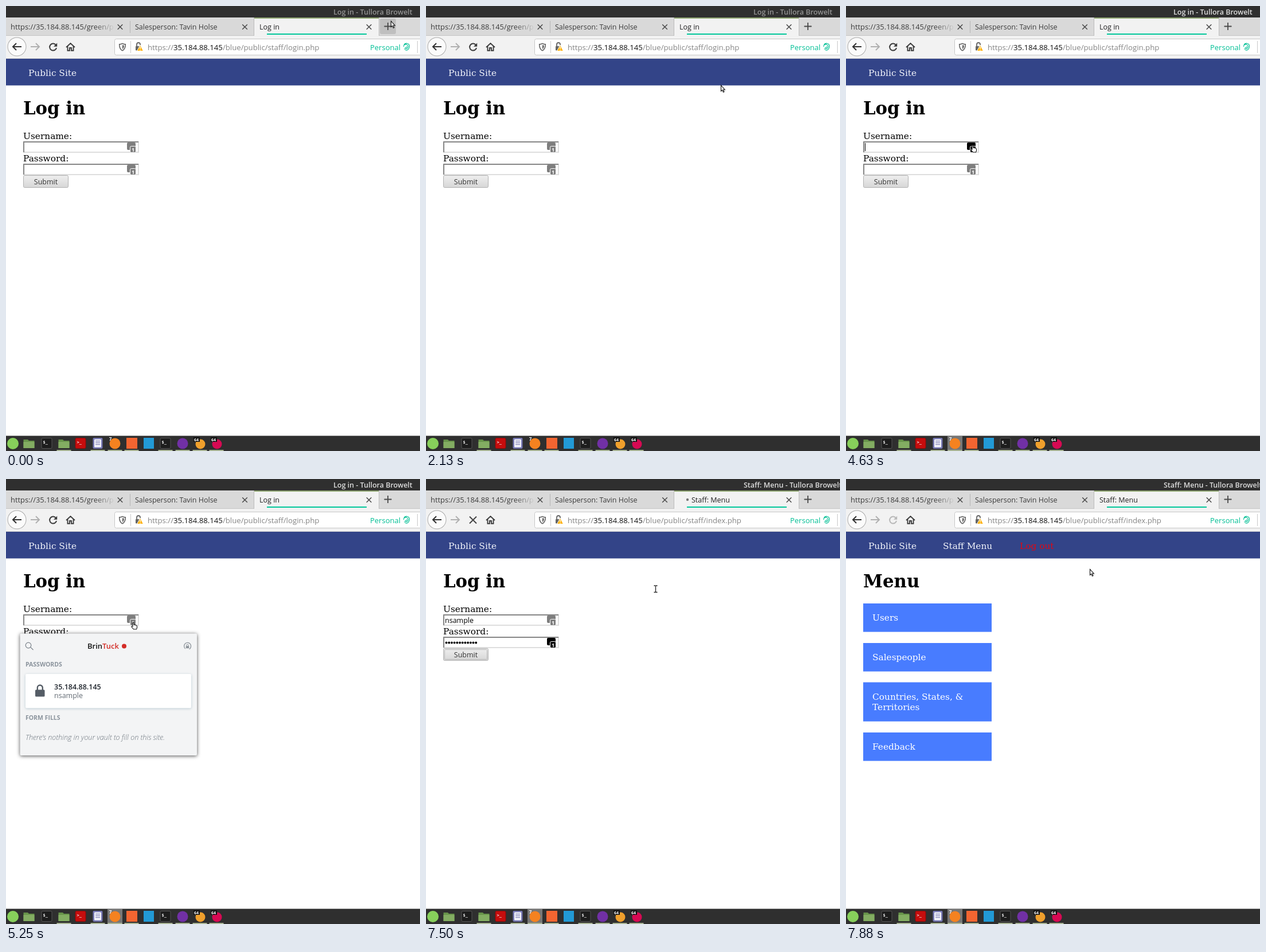
An HTML page with a canvas that plays this animation: 722x776 px, repeating every 8 s.

```html
<!DOCTYPE html>
<html lang="en">
<head>
<meta charset="utf-8">
<title>Log in</title>
<style>
html, body { margin: 0; width: 100%; height: 100%; overflow: hidden; background: #fff; }
canvas { display: block; }
</style>
</head>
<body>
<canvas id="stage" width="722" height="776"></canvas>
<script>
const ctx = document.getElementById('stage').getContext('2d');
const LOOP = 8000;
const UI = '"Open Sans", "Noto Sans", sans-serif';
const SERIF = '"DejaVu Serif", "Noto Serif", serif';
const MONO = '"DejaVu Sans Mono", monospace';
const BODY = `15.36px ${SERIF}`;
const HEADING = `bold 30.72px ${SERIF}`;
const HOST = '35.184.88.145';
const APP = 'Tullora Browelt';
const USER = 'nsample';

// Pointer positions: time, x, y, shape (arrow unless given)
const POINTER = [
  [0, 671, 26], [250, 648, 22], [380, 634, 19], [500, 625, 18],
  [880, 650, 17], [1000, 685, 12], [1130, 712, 10],
  [1630, 700, 18], [1750, 660, 46], [1880, 606, 84], [2000, 553, 119],
  [2130, 514, 138], [2250, 488, 142], [2380, 474, 137],
  [2500, 480, 134], [2630, 505, 118], [2750, 537, 95], [2880, 561, 80, 'beam'],
  [3500, 233, 204], [3750, 226, 223], [3880, 215, 240, 'hand'],
  [4500, 216, 241, 'hand'], [4630, 217, 242, 'hand'], [5000, 218, 249, 'hand'],
  [5500, 208, 317], [5750, 209, 341, 'hand'], [6000, 210, 346, 'hand'],
  [6250, 208, 346], [6380, 200, 346], [6630, 114, 316], [6880, 96, 312],
  [7000, 82, 309], [7250, 222, 281, 'hand'], [7500, 400, 191, 'beam'], [7630, 425, 157]
];

function rect(x, y, w, h, fill) {
  ctx.fillStyle = fill;
  ctx.fillRect(x, y, w, h);
}

function round(x, y, w, h, r, fill, stroke) {
  ctx.beginPath();
  ctx.roundRect(x, y, w, h, r);
  if (fill) { ctx.fillStyle = fill; ctx.fill(); }
  if (stroke) { ctx.strokeStyle = stroke; ctx.lineWidth = 1; ctx.stroke(); }
}

function disc(x, y, r, fill) {
  ctx.beginPath();
  ctx.arc(x, y, r, 0, Math.PI * 2);
  ctx.fillStyle = fill;
  ctx.fill();
}

function text(str, x, y, font, fill, align = 'left') {
  ctx.font = font;
  ctx.fillStyle = fill;
  ctx.textAlign = align;
  ctx.fillText(str, x, y);
  return x + ctx.measureText(str).width;
}

function path(d, x, y, { fill, stroke, width = 1 }) {
  ctx.save();
  ctx.translate(x, y);
  const p = new Path2D(d);
  if (fill) { ctx.fillStyle = fill; ctx.fill(p); }
  if (stroke) { ctx.strokeStyle = stroke; ctx.lineWidth = width; ctx.stroke(p); }
  ctx.restore();
}

const cross = (x, y, r, stroke, width) =>
  path(`M${-r} ${-r}L${r} ${r}M${r} ${-r}L${-r} ${r}`, x, y, { stroke, width });

function titleBar(s) {
  rect(0, 0, 722, 20, '#2f2f2f');
  const font = `600 12.5px ${UI}`;
  text(`${s.title} - ${APP}`, s.staff ? 554 : 571, 15, font, s.focused ? '#dedede' : '#929292');
}

function tabs(s, t) {
  const font = `12.5px ${UI}`;
  rect(0, 20, 722, 32, '#d9d9d9');
  rect(0, 51, 722, 1, '#c4c4c4');
  rect(216, 26, 1, 21, '#b5b5b5');

  const fade = ctx.createLinearGradient(155, 0, 190, 0);
  fade.addColorStop(0, '#3c3c3c');
  fade.addColorStop(1, '#3c3c3c00');
  ctx.save();
  ctx.beginPath();
  ctx.rect(0, 20, 189, 30);
  ctx.clip();
  text(`https://${HOST}/green/public`, 8, 40.5, `12.9px ${UI}`, fade);
  ctx.restore();
  text('Salesperson: Tavin Holse', 225, 40.5, font, '#3c3c3c');

  rect(432, 20, 219, 32, '#bdbdbd');
  rect(433, 20, 217, 32, '#f2f2f2');
  rect(433, 20, 217, 2, '#8fa571');
  rect(455, 48, 174, 2, '#00c79a');
  if (s.loading) disc(450 + 6 * Math.cos((t - 7500) / 250 * Math.PI), 36, 2.2, '#777');
  text(s.title, s.loading ? 463 : 442, 40.5, font, '#222');

  for (const x of [199, 416.5, 633]) cross(x, 36.5, 4.3, '#444', 1.4);
  if (t < 250) round(652, 22, 28, 27, 3, '#bfbfbf');
  path('M-6.5 0H6.5M0 -6.5V6.5', 666, 35.5, { stroke: '#4a4a4a', width: 1.8 });
}

function reload(color) {
  path('M5.2 -3.2A6 6 0 1 0 6 1.4', 82, 71.5, { stroke: color, width: 2 });
  path('M7.2 -7V-.8H1Z', 82, 71.5, { fill: color });
}

function toolbar(s) {
  rect(0, 52, 722, 40, '#f2f2f2');
  rect(0, 91, 722, 1, '#cfcfcf');

  disc(19, 71, 16.5, '#a9a9a9');
  disc(19, 71, 15.5, '#fbfbfb');
  path('M8 0H-6.5M-1 -6L-7 0L-1 6', 19, 71, { stroke: '#333', width: 2 });
  path('M-8 0H6.5M1 -6L7 0L1 6', 51, 71, { stroke: '#b0b0b0', width: 2 });
  if (s.stop) cross(82, 71.5, 6, '#444', 2);
  else reload(s.idle ? '#b8b8b8' : '#3c3c3c');
  path('M-7.5 .5L0 -6.5L7.5 .5M-5 -1V6.2H-1.5V1.5H1.5V6.2H5V-1', 112.5, 71.5,
    { stroke: '#3c3c3c', width: 1.9 });

  round(189.5, 57.5, 545, 28, 3, '#fff', '#c6c6c6');
  path('M0 -6.2C2 -5 4 -4.7 5.3 -4.7C5.3 1 4 4.5 0 6.3C-4 4.5 -5.3 1 -5.3 -4.7C-4 -4.7 -2 -5 0 -6.2Z',
    203, 71.5, { stroke: '#5c5c5c', width: 1.5 });
  path('M0 -3.6C1.2 -3.2 2 -3 2.8 -2.8C2.6 1 1.8 2.6 0 3.6Z', 203, 71.5, { fill: '#5c5c5c' });
  rect(217, 61, 1, 21, '#c9c9c9');
  rect(717, 61, 1, 21, '#c9c9c9');

  path('M-3 0V-3A3 3 0 0 1 3 -3V0', 231, 70, { stroke: '#666', width: 1.8 });
  round(226, 70, 10, 7.5, 1, '#666');
  path('M0 -5.5L5.5 5H-5.5Z', 234, 73.5, { fill: '#ffb000', stroke: '#fff' });
  rect(233.4, 71, 1.3, 4, '#fff');
  rect(233.4, 76, 1.3, 1.3, '#fff');

  const font = `13.2px ${UI}`;
  let x = text('https://', 247, 76.5, font, '#858585');
  x = text(HOST, x, 76.5, font, '#111');
  text(`/blue/public/staff/${s.staff ? 'index' : 'login'}.php`, x, 76.5, font, '#858585');
  text('Personal', 635, 76.5, `13px ${UI}`, '#00bf95');
  path('M-4.5 -3.5A5 5 0 0 1 5 -1.5C5 3 2.5 6 -2 6M-5 -.5A3.8 3.8 0 0 1 2.6 -1C2.6 2 .5 3.7 -4 3.7M-3 1.4C-.5 1.4 .3 .5 .2 -1',
    698.5, 71.5, { stroke: '#00bf95', width: 1.2 });
}

function fillIcon(y, color) {
  round(211, y, 15, 13, 2, color);
  round(216.5, y + 6.5, 10, 11, 2, color, '#fff');
  text('1', 221.6, y + 15.5, `bold 9px ${UI}`, '#fff', 'center');
}

function field(label, y, value, iconColor) {
  text(label, 30, y - 4, BODY, '#000');
  rect(30, y, 202, 20, '#dedede');
  rect(30, y, 201, 2, '#868686');
  rect(30, y, 2, 19, '#868686');
  rect(32, y + 2, 198, 16, '#fff');
  if (value) text(value, 33, y + 15, `12.5px ${UI}`, '#000');
  fillIcon(y + 2, iconColor);
}

function loginPage(s, t) {
  text('Log in', 30, 188.5, HEADING, '#000');
  const hot = t >= 3880 && t < 5000;
  field('Username:', 236, s.filled && USER, hot ? '#000' : '#7e7e7e');
  field('Password:', 275, '', t >= 7250 ? '#000' : '#7e7e7e');
  if (s.filled) for (let i = 0; i < 12; i++) disc(35.5 + i * 4.7, 285.5, 1.9, '#000');
  if (t >= 4130 && t < 5250) rect(33, 239, 1, 14, '#000');

  const g = ctx.createLinearGradient(0, 295, 0, 317);
  g.addColorStop(0, '#efefef');
  g.addColorStop(1, '#d6d6d6');
  round(30.5, 295.5, 78, 21, 2, g, '#b1b1b1');
  if (t >= 6880) round(32.5, 297.5, 74, 17, 1, null, '#b8b8b8');
  text('Submit', 69.5, 311, `12.5px ${UI}`, '#333', 'center');
}

function menuPage() {
  text('Staff Menu', 169, 122, BODY, '#f2f4fb');
  text('Log out', 303, 122, BODY, '#e00814');
  text('Menu', 30, 188.5, HEADING, '#000');
  const items = [[217, 'Users'], [286, 'Salespeople'],
    [354.5, 'Countries, States, &', 'Territories'], [442, 'Feedback']];
  for (const [y, ...lines] of items) {
    rect(30, y, 224, 31 + 18.6 * lines.length, '#487cff');
    lines.forEach((line, i) => text(line, 46, y + 30.3 + i * 18.6, BODY, '#fff'));
  }
}

function shadowBox(x, y, w, h, fill, color, blur, dy) {
  ctx.save();
  ctx.shadowColor = color;
  ctx.shadowBlur = blur;
  ctx.shadowOffsetY = dy;
  round(x, y, w, h, 2, fill);
  ctx.restore();
}

function popup() {
  shadowBox(24.5, 269.5, 308.5, 212.5, '#f3f4f5', '#000000b0', 6, 1);
  path('M3.3 3.3L8 8M4.3 0A4.8 4.8 0 1 1 -5.3 0A4.8 4.8 0 1 1 4.3 0', 39.5, 290,
    { stroke: '#7a828a', width: 1.2 });
  path('M-3.8 4.5A6 6 0 1 1 3 5.2', 316.5, 291.5, { stroke: '#8d949b', width: 1.3 });
  path('M-1.7 0V-1.5A1.7 1.7 0 0 1 1.7 -1.5V0', 316.5, 291.5, { stroke: '#8d949b' });
  rect(313.8, 291.2, 5.4, 4, '#8d949b');

  const brand = `600 13px ${UI}`;
  const x = text('Brin', 142, 296, brand, '#111');
  text('Tuck', x, 296, brand, '#d32d27');
  disc(206, 291.5, 4, '#d32d27');

  const head = `bold 10.5px ${UI}`;
  text('PASSWORDS', 34, 327, head, '#8b949d');
  text('FORM FILLS', 34, 420, head, '#8b949d');

  shadowBox(34, 340, 289, 59.5, '#fff', '#5f879866', 4, 1);
  path('M-4.5 0V-4A4.5 4.5 0 0 1 4.5 -4V0', 59.3, 368, { stroke: '#555d66', width: 2.4 });
  round(51, 367.5, 16.5, 12, 1.5, '#555d66');
  text(HOST, 84, 367, `600 12.5px ${UI}`, '#1b2129');
  text(USER, 84, 382, `12.5px ${UI}`, '#626a73');
  text("There's nothing in your vault to fill on this site.", 34, 455,
    `italic 300 12.6px ${UI}`, '#69727b');
}

function folder(x) {
  path('M-9.5 -7H-2L0 -5H9.5V8H-9.5Z', x, 763, { fill: '#67934a' });
  rect(x - 9.5, 760, 19, 11, '#83ad62');
}

function terminal(x, fill, edge, prompt = '$_') {
  round(x - 9, 753.5, 18, 18, 2, fill, edge);
  text(prompt, x - 6.5, 763, `bold 7px ${MONO}`, '#eee');
}

function badge(str, x) {
  rect(x - 5, 752, 11, 8, '#111');
  text(str, x, 759, `bold 7px ${UI}`, '#fff', 'center');
}

function taskbar(s) {
  rect(0, 749.5, 722, 26.5, '#2f2f2f');
  if (s.focused) rect(177, 750, 26, 26, '#777');
  for (const x of [101, 160, 190, 219, 278, 308, 338, 367])
    rect(x - 12.5, 774, 25, 2, '#a9b595');

  disc(12, 763, 10, '#87cf5b');
  folder(40);
  terminal(71, '#1d1d1d', '#555');
  folder(101);
  terminal(130, '#c40d0d', '#8d0909', '>_');
  round(151.5, 753, 17, 19, 2, '#7778b4');
  round(154, 755.5, 12, 14, 1, '#f4f4fa');
  for (const y of [758, 761, 764]) rect(156, y, 8, 1.3, '#8586b8');
  disc(190, 763, 9.5, '#f58220');
  text('7', 182, 757.5, `bold 8px ${UI}`, '#fff', 'center');
  rect(210, 753, 19, 19, '#f26531');
  rect(240, 753, 18, 19, '#229ad6');
  terminal(278, '#1d1d1d', '#555');
  disc(308, 763, 9.5, '#7130a5');
  disc(339, 764, 8.5, '#f0a02c');
  badge('64', 332);
  disc(368, 764, 8.5, '#d70a53');
  badge('64', 362);
}

function pointer(t) {
  const [, x, y, shape] = POINTER.findLast(p => p[0] <= t);
  if (shape === 'beam') {
    const d = 'M-3 -5.5H-1L0 -4.8L1 -5.5H3M-3 6H-1L0 5.3L1 6H3M0 -4.8V5.3';
    path(d, x + .5, y + .5, { stroke: '#fff', width: 3 });
    path(d, x + .5, y + .5, { stroke: '#222', width: 1.3 });
  } else if (shape === 'hand') {
    path('M3 8V1.5Q4 0 5 1.5V5L9 6Q10.5 6.5 10.5 8V10.5L9.5 13H4.5L1 9Q.5 7.5 2 7.5Z',
      x, y, { fill: '#fff', stroke: '#111', width: 1.1 });
  } else {
    path('M.5 .5V10.5L2.7 8.6L4.4 12.4L6 11.7L4.4 8H7.3Z', x, y,
      { fill: '#fff', stroke: '#111', width: 1.1 });
  }
}

function draw(t) {
  const staff = t >= 7500;
  const s = {
    staff,
    title: staff ? 'Staff: Menu' : 'Log in',
    focused: t >= 4130,
    filled: t >= 6250,
    loading: t >= 7000 && t < 7880,
    stop: (t >= 5000 && t < 5250) || (t >= 7000 && t < 7880),
    idle: t >= 7880
  };
  rect(0, 0, 722, 776, '#fff');
  titleBar(s);
  tabs(s, t);
  toolbar(s);
  rect(0, 92, 722, 46.5, '#334488');
  text('Public Site', 39, 122, BODY, '#f2f4fb');
  if (t >= 7630) menuPage();
  else loginPage(s, t);
  if (t >= 5250 && t < 6250) popup();
  taskbar(s);
  pointer(t);
}

const start = performance.now();
function tick() {
  draw((performance.now() - start) % LOOP);
  requestAnimationFrame(tick);
}
tick();
</script>
</body>
</html>
```
